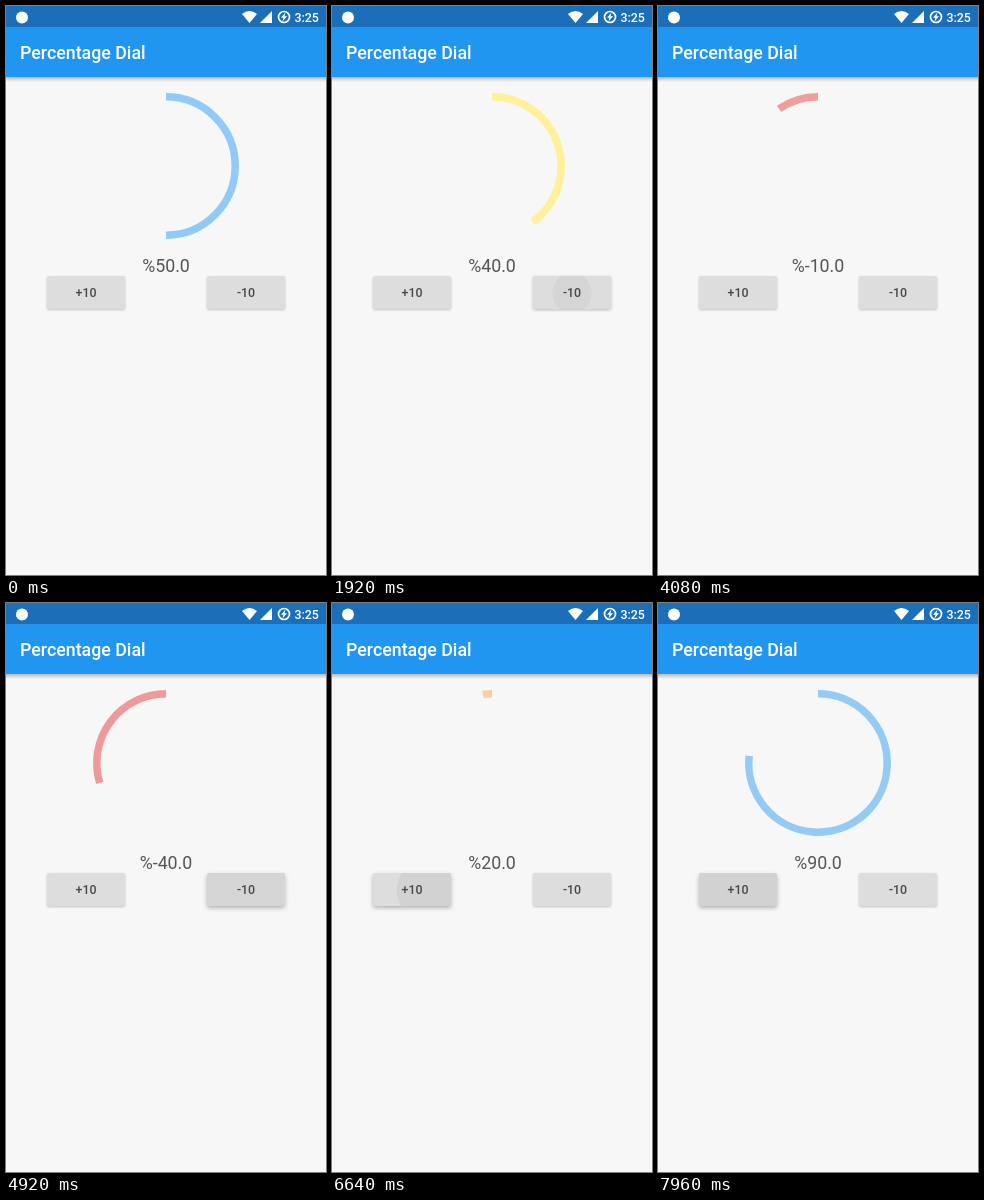
An HTML page that plays this animation: 320x569 px, repeating every 8000 ms.

```html
<!DOCTYPE html>
<html lang="en">
<head>
<meta charset="utf-8">
<title>Percentage Dial</title>
<style>
  html, body { margin: 0; width: 100%; height: 100%; overflow: hidden; background: #f7f7f7; }
  svg { display: block; width: 100vw; height: 100vh; }
  text { font-family: Roboto, sans-serif; }
  .label { font-size: 12.4px; font-weight: 500; fill: #484848; text-anchor: middle; }
  .icons { fill: #fff; }
</style>
</head>
<body>
<svg viewBox="0 0 320 569">
  <defs>
    <linearGradient id="shade" x2="0" y2="1">
      <stop stop-color="#000" stop-opacity=".25"/>
      <stop offset="1" stop-color="#000" stop-opacity="0"/>
    </linearGradient>
    <clipPath id="clipUp"><rect x="41" y="270" width="78" height="33" rx="2"/></clipPath>
    <clipPath id="clipDown"><rect x="201" y="270" width="78" height="33" rx="2"/></clipPath>
  </defs>
  <rect width="320" height="569" fill="#f7f7f7"/>
  <rect y="71" width="320" height="5" fill="url(#shade)"/>
  <rect width="320" height="71" fill="#2196f1"/>
  <rect width="320" height="21" fill="#1a6fb8"/>

  <g class="icons">
    <circle cx="16" cy="11.5" r="6"/>
    <path d="M236 8Q243.500 2 251 8L243.500 17Z"/>
    <path d="M266 5V17H254Z"/>
    <circle cx="278" cy="11" r="5.500" fill="none" stroke="#fff" stroke-width="1.700"/>
    <path d="M279.500 6.500L275 11.800H277.500L276.500 15.500L281 10.200H278.500Z"/>
    <text x="288.500" y="15.500" font-size="12.4" font-weight="500">3:25</text>
    <text x="14" y="52.500" font-size="17.8" font-weight="500">Percentage Dial</text>
  </g>

  <path id="arc" fill="none" stroke-width="7.500"/>
  <text id="value" x="160" y="266" font-size="17.8" fill="#555" text-anchor="middle"></text>

  <g id="up">
    <rect x="41" y="270" width="78" height="33" rx="2" fill="#dddddd"/>
    <circle cy="287" fill="#d2d2d2" clip-path="url(#clipUp)"/>
    <text class="label" x="80" y="291">+10</text>
  </g>
  <g id="down">
    <rect x="201" y="270" width="78" height="33" rx="2" fill="#dddddd"/>
    <circle cy="287" fill="#d5d5d5" clip-path="url(#clipDown)"/>
    <text class="label" x="240" y="291">-10</text>
  </g>
</svg>
<script>
const LOOP = 8000, DURATION = 350, START = 50;
const RED = [239, 154, 154], YELLOW = [255, 240, 153], BLUE = [144, 202, 249];
const $ = id => document.getElementById(id);
const clamp = x => Math.max(0, Math.min(1, x));
const ease = x => 0.5 - Math.cos(Math.PI * clamp(x)) / 2;
const mix = (a, b, k) => a + (b - a) * k;
const colorOf = v => v < 0 ? RED : v < 50 ? YELLOW : BLUE;

const downTimes = [1560, 1960, 2440, 2820, 3360, 3780, 4200, 4590, 4880, 5020];
const upTimes = [5600, 5760, 5920, 6100, 6290, 6440, 6580, 6720, 6910, 7120, 7290, 7470, 7650, 7865];
const buttons = [
  { el: $('down'), step: -10, lead: 70, times: downTimes, touch: () => 240 },
  { el: $('up'), step: 10, lead: 0, times: upTimes, touch: s => s > 7800 ? 80 : 95 }
];

// Each tap restarts the tween from wherever the dial currently is.
function dialAt(t) {
  let target = START, from = START, color = BLUE, began = -DURATION;
  const now = time => {
    const k = ease((time - began) / DURATION);
    return { target, value: mix(from, target, k), rgb: color.map((c, i) => mix(c, colorOf(target)[i], k)) };
  };
  for (const { step, times } of buttons) {
    for (const time of times) {
      if (time > t) break;
      const s = now(time);
      from = s.value;
      color = s.rgb;
      target += step;
      began = time;
    }
  }
  return now(t);
}

function drawDial(t) {
  const { target, value, rgb } = dialAt(t);
  const a = value / 50 * Math.PI, r = 69.2;
  const large = Math.abs(value) > 50 ? 1 : 0, sweep = value > 0 ? 1 : 0;
  $('arc').setAttribute('d',
    `M160 ${160 - r}A${r} ${r} 0 ${large} ${sweep} ${160 + r * Math.sin(a)} ${160 - r * Math.cos(a)}`);
  $('arc').setAttribute('stroke', `rgb(${rgb.map(Math.round)})`);
  $('value').textContent = '%' + target.toFixed(1);
}

function drawButton({ el, lead, times, touch }, t) {
  let lift = 0, age = 1e4, x = 0;
  for (const time of times) {
    const a = t - time + lead;
    if (a < 0) break;
    lift = Math.max(lift, clamp(a / 60) * clamp((330 - a) / 130));
    age = a;
    x = touch(time);
  }
  const [box, ripple] = el.children;
  box.style.filter = `drop-shadow(0 ${1 + lift}px ${1 + lift}px rgba(0,0,0,${0.22 + 0.06 * lift}))`;
  ripple.setAttribute('cx', x);
  ripple.setAttribute('r', 9 + 0.35 * Math.min(age, 250));
  ripple.setAttribute('opacity', clamp((220 - age) / 80));
}

const origin = performance.now();
function frame() {
  const t = (performance.now() - origin) % LOOP;
  drawDial(t);
  buttons.forEach(b => drawButton(b, t));
  requestAnimationFrame(frame);
}
frame();
</script>
</body>
</html>
```
